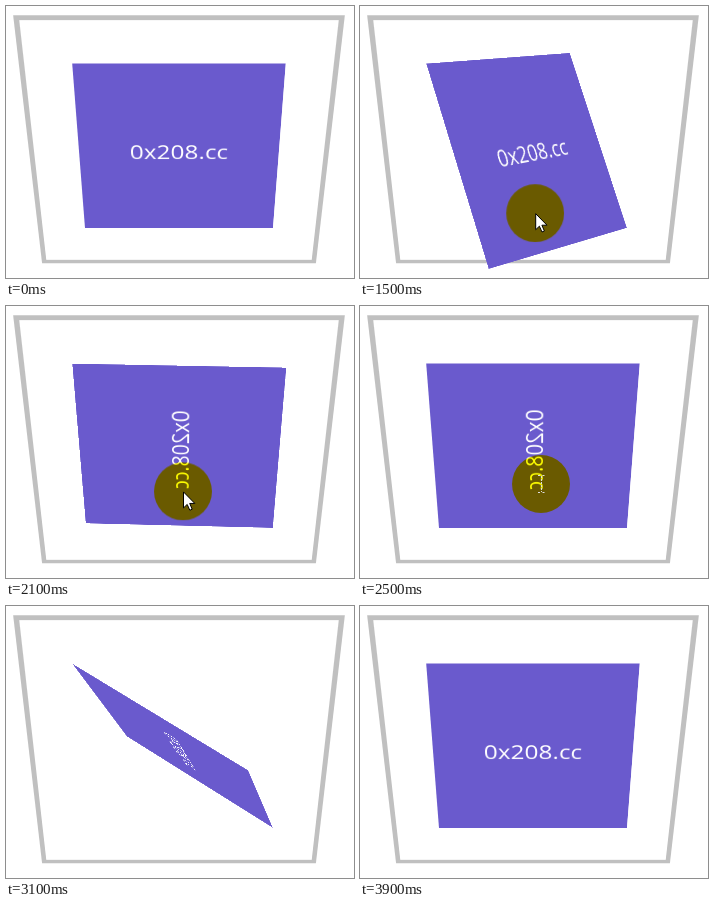
Animation, 348 px wide and 272 px high, one loop 4500 ms. Source, as an HTML page:

```html
<!DOCTYPE html>
<html lang="en">
<head>
<meta charset="utf-8">
<title>Diagonal flip</title>
<style>
  html, body {
    margin: 0;
    width: 100%;
    height: 100%;
    overflow: hidden;
    background: #fff;
  }
  .frame {
    position: absolute;
    left: 23px;
    top: -5.5px;
    width: 300px;
    height: 300px;
    box-sizing: border-box;
    border: 5px solid silver;
    transform: perspective(900px) rotateX(-35deg);
    transform-style: preserve-3d;
  }
  .card {
    position: absolute;
    left: 45px;
    top: 45px;
    width: 200px;
    height: 200px;
    box-sizing: border-box;
    padding-top: 1px;
    background: slateblue;
    color: #fff;
    font: 24.4px/200px "Open Sans", "Noto Sans", sans-serif;
    text-align: center;
  }
  .spot, .pointer {
    position: absolute;
    left: 0;
    top: 0;
    visibility: hidden;
  }
  .spot {
    width: 58px;
    height: 58px;
    margin: -29px 0 0 -29px;
    border-radius: 50%;
    background: #ff0;
    mix-blend-mode: multiply;
  }
  .pointer { overflow: visible; }
</style>
</head>
<body>
<div class="frame"><div class="card" id="card">0x208.cc</div></div>
<div class="spot" id="spot"></div>
<svg class="pointer" id="pointer" width="12" height="20">
  <path id="arrow" d="M.5 .5V16.5L4.2 13L6.8 18.8L9.2 17.8L6.7 12H11.8Z" fill="#fff" stroke="#000"/>
  <path id="beam" d="M-3 -8.5H-.5M1.5 -8.5H4M.5 -8V8M-3 8.5H-.5M1.5 8.5H4" fill="none" stroke="#ddd" stroke-dasharray="2 1"/>
</svg>
<script>
  const LOOP = 4500, STEP = 100, TURN = 1000;
  const ENTER = 1268, LEAVE = 2899;
  // time, x, y of the pointer
  const path = [
    [1300, 176, 218], [1800, 174, 191], [2500, 181, 178],
    [2700, 205, 175], [2900, 276, 172], [3000, 332, 170], [3100, 400, 168]
  ];
  const [card, spot, pointer, arrow, beam] =
    ['card', 'spot', 'pointer', 'arrow', 'beam'].map(id => document.getElementById(id));

  const bezier = (a, b, u) => 3 * a * u * (1 - u) ** 2 + 3 * b * u * u * (1 - u) + u ** 3;

  // CSS "ease": cubic-bezier(.25, .1, .25, 1)
  function ease(x) {
    if (x <= 0) return 0;
    if (x >= 1) return 1;
    let lo = 0, hi = 1;
    for (let i = 0; i < 24; i++) {
      const mid = (lo + hi) / 2;
      if (bezier(.25, .25, mid) < x) lo = mid; else hi = mid;
    }
    return bezier(.1, 1, lo);
  }

  function pointAt(t) {
    const i = path.findIndex(p => p[0] > t);
    const [t0, x0, y0] = path[i - 1], [t1, x1, y1] = path[i];
    const k = (t - t0) / (t1 - t0);
    return [x0 + (x1 - x0) * k, y0 + (y1 - y0) * k];
  }

  function draw(now) {
    const t = Math.floor((now % LOOP) / STEP) * STEP;
    const angle = 180 * (ease((t - ENTER) / TURN) - ease((t - LEAVE) / TURN));
    card.style.transform = `rotate3d(1, 1, 0, ${angle}deg)`;

    const shown = t >= path[0][0] && t < path[path.length - 1][0];
    spot.style.visibility = pointer.style.visibility = shown ? 'visible' : 'hidden';
    if (shown) {
      const [x, y] = pointAt(t);
      spot.style.transform = pointer.style.transform = `translate(${x}px, ${y}px)`;
      const overText = t >= 2200 && t <= 2600;
      arrow.style.display = overText ? 'none' : '';
      beam.style.display = overText ? '' : 'none';
    }
  }

  const start = performance.now();
  function tick() {
    draw(performance.now() - start);
    requestAnimationFrame(tick);
  }
  tick();
</script>
</body>
</html>
```
